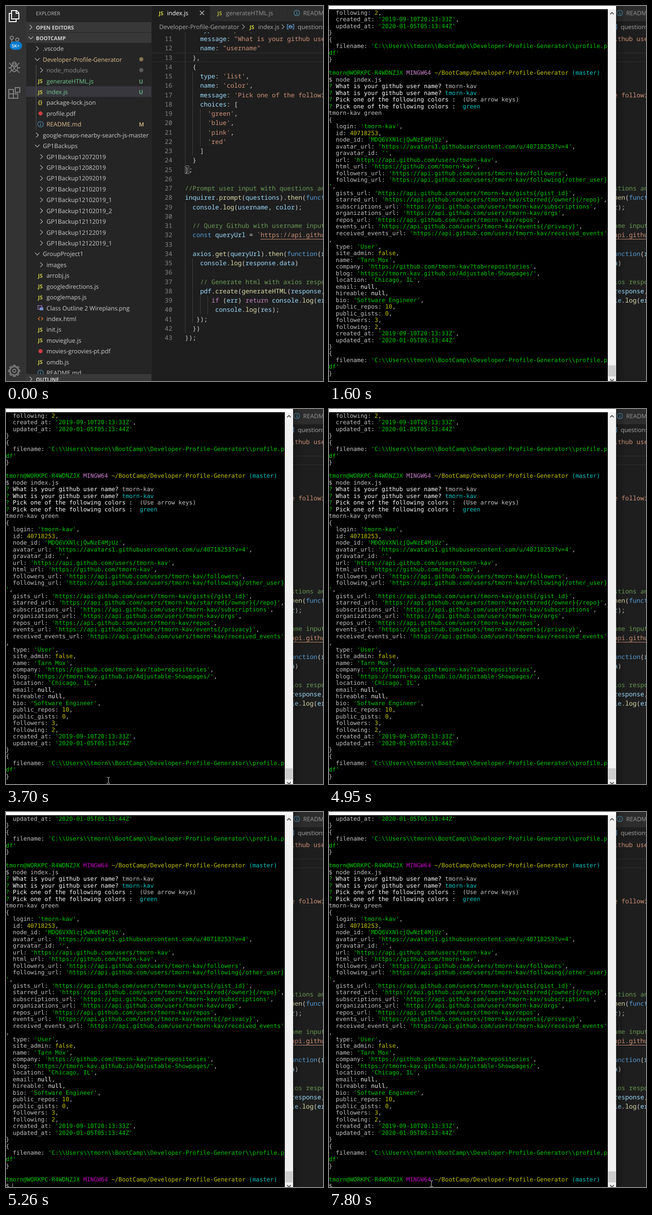
Animation of 689 by 813 pixels, one loop 8000 ms. Source, as an HTML page with a canvas:

```html
<!DOCTYPE html>
<html lang="en">
<head>
<meta charset="utf-8">
<title>Editor and terminal</title>
<style>
html, body { margin: 0; width: 100%; height: 100%; overflow: hidden; background: #1e1e1e; }
canvas { display: block; }
</style>
</head>
<body>
<canvas id="stage" width="689" height="813"></canvas>
<script>
const ctx = document.getElementById('stage').getContext('2d');
const LOOP = 8000, W = 689, H = 813;
const SANS = '"Open Sans", "Noto Sans", sans-serif';
const CODE_FONT = '13.7px "Noto Sans Mono", monospace';
const TERM_FONT = '12.72px "DejaVu Sans Mono", monospace';
const UI = `13.06px ${SANS}`;
const YELLOW = '#cbcb41', BLUE = '#519aba', GREY = '#858585';
const MAGENTA = '#bf00bf', PALE = '#cf7fcf';
ctx.textRendering = 'geometricPrecision';

// ---------- helpers ----------
function rect(x, y, w, h, color) {
  ctx.fillStyle = color;
  ctx.fillRect(x, y, w, h);
}
function label(text, x, y, color, font = UI) {
  ctx.font = font;
  ctx.fillStyle = color;
  ctx.fillText(text, x, y + 5);
}
function stroke(d, color, width = 1, x = 0, y = 0) {
  ctx.save();
  ctx.translate(x, y);
  ctx.strokeStyle = color;
  ctx.lineWidth = width;
  ctx.stroke(new Path2D(d));
  ctx.restore();
}
function dot(x, y, r, color) {
  ctx.fillStyle = color;
  ctx.beginPath();
  ctx.arc(x, y, r, 0, 7);
  ctx.fill();
}
function clipped(x, y, w, h, draw) {
  ctx.save();
  ctx.beginPath();
  ctx.rect(x, y, w, h);
  ctx.clip();
  draw();
  ctx.restore();
}
// Splits a line into [character, colour] pairs, one colour per regex group.
function paint(line, re, colors, base) {
  const out = [...line].map(ch => [ch, base]);
  for (const m of line.matchAll(re)) {
    const color = colors[m.slice(1).findIndex(g => g !== undefined)];
    for (let i = 0; i < m[0].length; i++) out[m.index + i][1] = color;
  }
  return out;
}
function grid(cells, x, y, step) {
  cells.forEach(([ch, color], i) => {
    if (ch === ' ') return;
    ctx.fillStyle = color;
    ctx.fillText(ch, x + i * step, y);
  });
}

// ---------- icons ----------
const chevron = (x, y, open, color = '#c5c5c5') =>
  stroke(open ? 'M-5-2.5L0 2.5L5-2.5' : 'M-2.5-5L2.5 0L-2.5 5', color, 1.1, x, y);
const js = (x, y) => label('JS', x - 5.5, y - 0.5, YELLOW, `bold 11.5px ${SANS}`);
function info(x, y) {
  stroke('M6 0A6 6 0 1 1-6 0A6 6 0 1 1 6 0', BLUE, 1.1, x, y);
  stroke('M0-3.5V-2M0-.5V3.5', BLUE, 1.5, x, y);
}
const icons = {
  j: js,
  i: info,
  b: (x, y) => label('{}', x - 5.5, y - 1, YELLOW, `bold 12px ${SANS}`),
  p: (x, y) => dot(x, y, 4.5, '#cc3e44'),
  h: (x, y) => stroke('M-1.5-3.5L-5 0L-1.5 3.5M1.5-3.5L5 0L1.5 3.5', '#e37933', 1.4, x, y),
  m: (x, y) => {
    stroke('M-5.5-5H3V3H-5.5Z', '#a074c4', 1.4, x, y);
    rect(x - 2, y - 1, 8, 6, '#7a8fd0');
  },
  '>': (x, y) => chevron(x, y, false),
  v: (x, y) => chevron(x, y, true),
};

// ---------- side bar ----------
const backups = ['07', '08', '09', '10', '10', '10', '11', '12', '12']
  .map((d, i) => ` > GP1Backup12${d}2019${{ 4: '_1', 5: '_2', 8: '_1' }[i] || ''}`);
const files = [
  '> .vscode', 'v Developer-Profile-Generator', ' > node_modules', ' j generateHTML.js',
  ' j index.js', ' b package-lock.json', ' p profile.pdf', ' i README.md',
  '> google-maps-nearby-search-js-master', 'v GP1Backups', ...backups,
  'v GroupProject1', ' > images', ' j arrobj.js', ' j googledirections.js',
  ' j googlemaps.js', ' m Class Outline 2 Wireplans.png', ' h index.html', ' j init.js',
  ' j movieglue.js', ' p movies-groovies-pt.pdf', ' j omdb.js', ' i README.md',
];
const tint = { 1: '#e2c08d', 2: '#8c8c8c', 3: '#73c991', 4: '#73c991', 7: '#e2c08d' };
const status = { 3: 'U', 4: 'U', 7: 'M' };

function header(text, y, open) {
  rect(44, y - 11, 272, 22, '#383838');
  chevron(54, y, open);
  label(text, 65, y - 0.5, '#d0d0d0', `bold 11.4px ${SANS}`);
}
function sideBar() {
  rect(44, 0, 273, H, '#252526');
  label('EXPLORER', 65, 15, '#bbbbbb', `11px ${SANS}`);
  header('OPEN EDITORS', 46, false);
  header('BOOTCAMP', 69, true);
  rect(44, 174, 272, 23, '#37373d');
  rect(65, 128, 1, 140, '#585858');
  files.forEach((row, i) => {
    const child = row[0] === ' ', [kind, ...name] = row.trim().split(' ');
    const y = 92.3 + i * 23.43, folder = '>v'.includes(kind);
    icons[kind](child ? (folder ? 77 : 75) : 68, y);
    label(name.join(' '), child ? 88 : 80, y, tint[i] || '#cccccc');
    if (status[i]) label(status[i], 289, y, tint[i], `600 12px ${SANS}`);
  });
  dot(294, 115.5, 4.5, '#857450');
  dot(294, 139, 4.5, '#5a5a5a');
  header('OUTLINE', 809, false);
}

// ---------- activity bar ----------
function activityBar() {
  rect(0, 0, 44, H, '#333333');
  stroke('M12 15V10H23L28 15V28H12ZM22 10V16H28M12 16H7V34H22V28', '#ffffff', 2);
  stroke('M16 69A3.5 3.5 0 1 1 9 69A3.5 3.5 0 1 1 16 69M12.5 73V92M28 73A3.5 3.5 0 1 1 21 73A3.5 3.5 0 1 1 28 73M24 77Q23 82 13 82', GREY, 2);
  ctx.fillStyle = '#007acc';
  ctx.beginPath();
  ctx.roundRect(8, 77, 27, 18, 9);
  ctx.fill();
  label('5K+', 12.5, 85, '#ffffff', `600 9.5px ${SANS}`);
  stroke('M25 134A7 8.5 0 1 1 11 134A7 8.5 0 1 1 25 134M12 130H24M13 126Q18 117 23 126M5 134H11M25 134H31M7 123L12 129M29 123L24 129M7 145L12 139M29 145L24 139M14 130L22 140M22 130L14 140', GREY, 1.8);
  stroke('M6 181H16V200H6ZM6 190.5H25.5V200H16M20 177H30V187H20Z', GREY, 2);
  ctx.save();
  ctx.translate(18, 791);
  for (let i = 0; i < 8; i++) {
    ctx.rotate(Math.PI / 4);
    stroke('M-2.5-8.5L-2-12H2L2.5-8.5', GREY, 1.8);
  }
  stroke('M9 0A9 9 0 1 1-9 0A9 9 0 1 1 9 0M3.5 0A3.5 3.5 0 1 1-3.5 0A3.5 3.5 0 1 1 3.5 0', GREY, 1.8);
  ctx.restore();
}

// ---------- editor ----------
const code = String.raw`    type: 'input',
    message: "What is your github user name?",
    name: "username"
  },
  {
    type: 'list',
    name: 'color',
    message: 'Pick one of the following colors',
    choices: [
      'green',
      'blue',
      'pink',
      'red'
    ]
  }
];

//Prompt user input with questions and
inquirer.prompt(questions).then(function(
  console.log(username, color);

  // Query Github with username input
  const queryUrl = ${'`'}https://api.github.com

  axios.get(queryUrl).then(function(res
    console.log(response.data)

    // Generate html with axios response
    pdf.create(generateHTML(response, color
       if (err) return console.log(err
        console.log(res);
   });
  })
});`.split('\n').map(line => paint(line,
  /(\/\/.*)|("[^"]*"?|'[^']*'?|`.*)|(\b(?:const|function)\b)|(\b(?:if|return)\b)|(\w+(?=\())|([A-Za-z]\w*)/g,
  ['#6a9955', '#ce9178', '#569cd6', '#c586c0', '#dcdcaa', '#9cdcfe'], '#d4d4d4'));

// Indent guides: column, first line, last line.
const guides = [[0, 10, 24], [2, 15, 23], [4, 19, 22], [0, 29, 42], [2, 35, 41], [4, 39, 40], [6, 39, 40]];
const lineY = n => 71 + (n - 11) * 20.25;

function codeArea() {
  rect(317, 101, 372, 2, '#282828');
  rect(317, 120, 372, 2, '#282828');
  for (const [col, a, b] of guides)
    rect(Math.round(389 + col * 8.22), lineY(a) - 10, 1, (b - a + 1) * 20.25, '#404040');
  ctx.font = CODE_FONT;
  code.forEach((cells, i) => {
    const n = i + 10, y = lineY(n) + 5;
    grid([...String(n)].map(ch => [ch, GREY]), 345, y, 8.22);
    grid(cells, 389, y, 8.22);
  });
  rect(553, 505, 136, 1, '#ce9178');
  stroke('M389.5 346.5H397.5V363.5H389.5Z', '#888888');
}
function editor() {
  rect(317, 0, 372, H, '#1e1e1e');
  clipped(317, 57, 372, 756, codeArea);
  rect(444, 0, 245, 33, '#2d2d2d');
  rect(443, 0, 1, 33, '#252526');
  rect(612, 0, 1, 33, '#252526');
  js(337.5, 15);
  label('index.js', 350, 15, '#ffffff');
  stroke('M-4.5-4.5L4.5 4.5M4.5-4.5L-4.5 4.5', '#d0d0d0', 1.2, 426, 15);
  ctx.globalAlpha = 0.8;
  js(465, 15);
  ctx.globalAlpha = 1;
  label('generateHTML.js', 478, 15, '#969696');
  info(632, 15);
  label('README.md', 646, 15, '#969696');
  label('Developer-Profile-Generator', 333, 45, '#a9a9a9', `13.2px ${SANS}`);
  chevron(516, 45, false, '#a9a9a9');
  js(535, 45);
  label('index.js', 548, 45, '#a9a9a9');
  chevron(602, 45, false, '#a9a9a9');
  stroke('M-4-5H-7V5H-4M4-5H7V5H4M-3.5-1L0-3L3.5-1V2L0 3.5L-3.5 2ZM-3.5-1L0 .5L3.5-1', '#75beff', 1.1, 618.5, 45);
  label('questions', 634, 45, '#a9a9a9');
}

// ---------- terminal ----------
const COLS = 79, CELL = 7.66, ROW = 14.48;
const prompt = 'tmorn@WORKPC-R4WDNZJX MINGW64 ~/BootCamp/Developer-Profile-Generator (master)';
const tail = String.raw`  following: 2,
  created_at: '2019-09-10T20:13:33Z',
  updated_at: '2020-01-05T05:13:44Z'
}
{
  filename: 'C:\\Users\\tmorn\\BootCamp\\Developer-Profile-Generator\\profile.pdf'
}

${prompt}
`;
const api = 'https://api.github.com/users/tmorn-kav';
// Text after a bar is cyan.
const output = tail + `$ node index.js
? What is your github user name? tmorn-kav
? What is your github user name? |tmorn-kav
? Pick one of the following colors :  (Use arrow keys)
? Pick one of the following colors :  |green
tmorn-kav green
{
  login: 'tmorn-kav',
  id: 40718253,
  node_id: 'MDQ6VXNlcjQwNzE4MjUz',
  avatar_url: 'https://avatars1.githubusercontent.com/u/40718253?v=4',
  gravatar_id: '',
  url: '${api}',
  html_url: 'https://github.com/tmorn-kav',
  followers_url: '${api}/followers',
  following_url: '${api}/following{/other_user}',
  gists_url: '${api}/gists{/gist_id}',
  starred_url: '${api}/starred{/owner}{/repo}',
  subscriptions_url: '${api}/subscriptions',
  organizations_url: '${api}/orgs',
  repos_url: '${api}/repos',
  events_url: '${api}/events{/privacy}',
  received_events_url: '${api}/received_events',
  type: 'User',
  site_admin: false,
  name: 'Tarn Mox',
  company: 'https://github.com/tmorn-kav?tab=repositories',
  blog: 'https://tmorn-kav.github.io/Adjustable-Showpages/',
  location: 'Chicago, IL',
  email: null,
  hireable: null,
  bio: 'Software Engineer',
  public_repos: 10,
  public_gists: 0,
  followers: 3,
` + tail + '$';

const rows = output.split('\n').flatMap(line => {
  const [head, cyan = ''] = line.split('|');
  const cells = paint(head,
    /('[^']*'|^\?|^\S+@\S+)|(MINGW64)|(~\/\S+|\b\d+(?=,)|false)|(\(master\))|(What.*name\?|Pick.* :|null)/g,
    ['#00c800', MAGENTA, '#c4c400', '#00c4c4', '#ffffff'], '#c4c4c4');
  for (const ch of cyan) cells.push([ch, '#00c4c4']);
  const parts = [];
  do parts.push(cells.splice(0, COLS)); while (cells.length);
  return parts;
});

function screen(top, bottom) {
  ctx.font = TERM_FONT;
  for (let i = top; i < bottom; i++) {
    const cells = top ? rows[i] : rows[i].map(([ch, c]) => [ch, c === MAGENTA ? PALE : c]);
    grid(cells, -0.5, Math.round(19 + (i - top) * ROW), CELL);
  }
}
function terminal(t) {
  const shade = ctx.createLinearGradient(624, 0, 644, 0);
  shade.addColorStop(0, 'rgba(0,0,0,.25)');
  shade.addColorStop(1, 'rgba(0,0,0,0)');
  rect(624, 0, 20, H, shade);
  rect(0, 0, 624, 8, '#ffffff');
  rect(0, 7, 606, H, '#000000');
  rect(606, 7, 18, H, '#f0f0f0');
  rect(607, 779, 16, 24, '#cdcdcd');
  stroke('M-4 2L0-2L4 2', '#505050', 1.8, 615, 16);
  stroke('M-4-2L0 2L4-2', '#505050', 1.8, 615, 811);
  if (t < 5180) screen(0, 55);
  else screen(2, rows.length);
  const blink = t < 5730 || (t >= 6270 && t < 6800) || (t >= 7280 && t < 7800);
  if (t >= 5260 && blink) rect(14, 805, 1, 8, '#bfbfbf');
}

// ---------- mouse and preview ----------
const ibeam = (x, y) =>
  stroke('M-3 .5H-1L.5 1.5L2 .5H4M.5 1.5V12.5M-3 13.5H-1L.5 12.5L2 13.5H4', '#d8d8d8', 1, x, y);

function mouse(t) {
  if (t >= 2140 && t < 2830) {
    const p = Math.floor((t - 2140) / 76.7) / 8;
    ibeam(Math.round(476 - 156 * p), 798 + Math.round(12 * (2 * p - 1) ** 2));
  } else if (t >= 3460 && t < 4950) {
    const p = Math.min(3, Math.floor((t - 3460) / 80)) / 3;
    ibeam(Math.round(228 - 6 * p), 798 + Math.round(10 * (1 - p)));
  } else if (t >= 6340) {
    ibeam(t < 7510 ? 221 : 222, t < 6420 ? 803 : 799);
  }
}
function preview(alpha) {
  ctx.save();
  ctx.globalAlpha = alpha;
  rect(648, 686, 41, 127, '#c9c9c9');
  dot(665, 703, 6.5, '#d6b85a');
  label('MINGW64', 682, 703, '#303030');
  rect(657, 720, 32, 93, '#000000');
  ctx.translate(657, 719);
  ctx.scale(0.28, 0.28);
  screen(0, 24);
  ctx.restore();
}

function draw(now) {
  const t = now % LOOP;
  rect(0, 0, W, H, '#1e1e1e');
  editor();
  if (t < 1600) {
    sideBar();
    activityBar();
    if (t >= 1140) preview(t < 1220 ? 0.35 : t < 1300 ? 0.7 : 1);
  } else {
    terminal(t);
    mouse(t);
  }
  requestAnimationFrame(draw);
}
draw(performance.now());
</script>
</body>
</html>
```
